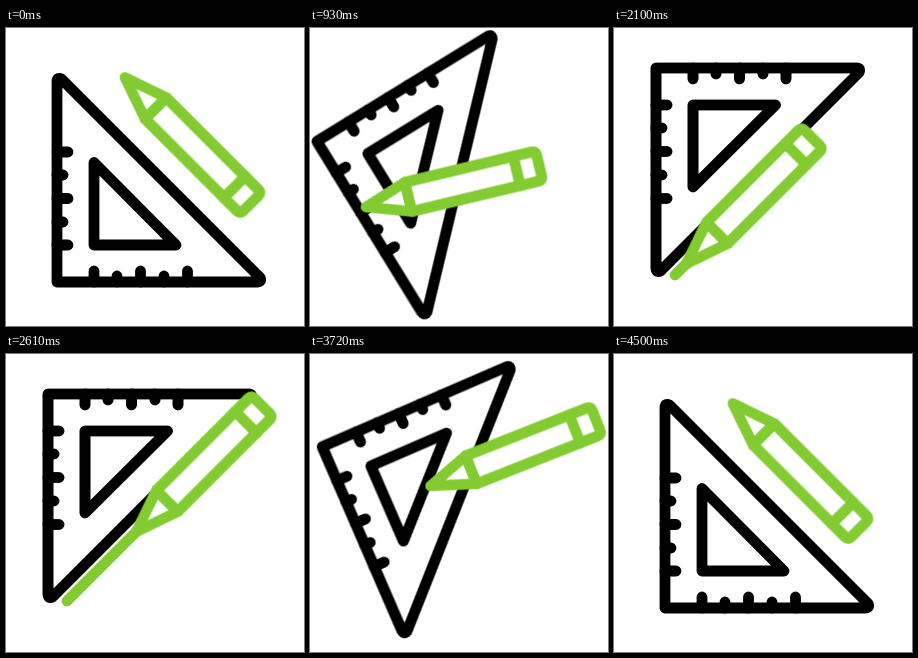
Animation of 298x298 px, one loop 4830 ms. Source, as an HTML page:

```html
<!DOCTYPE html>
<html lang="en">
<head>
<meta charset="utf-8">
<title>Set square and pencil</title>
<style>
  html, body { margin: 0; width: 100%; height: 100%; overflow: hidden; background: #fff; }
  svg { display: block; width: 100vw; height: 100vh; }
  path { fill: none; stroke-width: 10.8; stroke-linecap: round; stroke-linejoin: round; }
  .ink { stroke: #000; }
  .lead { stroke: #82cc32; }
  .body { fill: #fff; }

  .square, .pencil, .line {
    animation: 4830ms cubic-bezier(.3333, 0, .6667, 1) infinite;
  }
  .square { transform-origin: 149px 149px; animation-name: turn; }
  .pencil { transform-origin: 7px 3px; animation-name: write; }
  .line { stroke-dasharray: 1 2; animation-name: draw, show; }

  /* 300-1350 turn, 1860-2940 draw, 3330-4500 return */
  @keyframes turn {
    0%, 6.2112%, 93.1677%, 100% { transform: translate(0px, 0px) rotate(0deg); }
    27.9503%, 68.9441% { transform: translate(-2px, -11px) rotate(90deg); }
  }
  @keyframes write {
    0%, 6.2112%, 93.1677%, 100% { transform: translate(177px, 115.8px) rotate(45deg); }
    27.9503%, 38.5093% { transform: translate(123.3px, 179px) rotate(-45deg); }
    60.8696%, 68.9441% { transform: translate(212.3px, 90px) rotate(-45deg); }
  }
  @keyframes draw {
    0%, 38.5093% { stroke-dashoffset: 1; }
    60.8696%, 100% { stroke-dashoffset: 0; }
  }
  @keyframes show {
    0%, 38.5%, 75.1553%, 100% { opacity: 0; }
    38.51%, 68.9441% { opacity: 1; }
  }
</style>
</head>
<body>
<svg viewBox="0 0 298 298">
  <g class="square">
    <path class="ink" d="M51 254V53Q51.500 49 55.500 51L254 249.500Q256 253.500 252 254Z"/>
    <path class="ink" d="M88 134.500V217H170Z"/>
    <path class="ink" d="M51 124h11M51 147h6M51 170.500h11M51 194h6M51 217h11"/>
    <path class="ink" d="M88 254v-11M111 254v-6M134.500 254v-11M158 254v-6M181.500 254v-11"/>
    <path class="lead line" pathLength="1" d="M258 235L169 146"/>
  </g>
  <g class="pencil">
    <path class="lead body" d="M-88 0L-44.500 -15H86Q90 -15 90 -11V11Q90 15 86 15H-44.500Z"/>
    <path class="lead" d="M-44.500 -15V15M67 -15V15"/>
  </g>
</svg>
</body>
</html>
```
